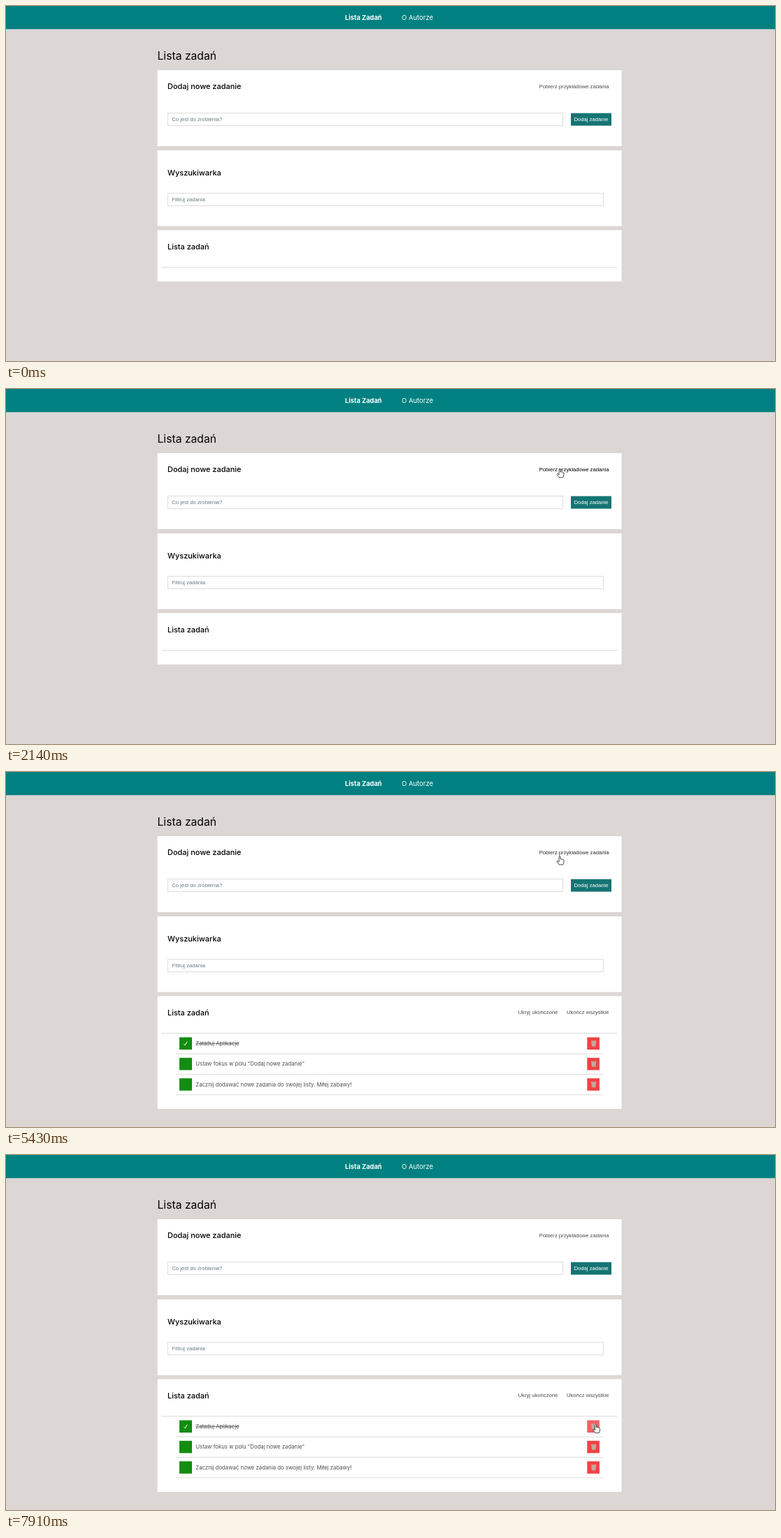
An HTML page that plays this animation: 1100x509 px, repeating every 8 s.

```html
<!DOCTYPE html>
<html lang="pl">
<head>
<meta charset="utf-8">
<title>Lista zadań</title>
<style>
  html, body { margin: 0; width: 100%; height: 100%; overflow: hidden; background: #dcd6d5; }
  svg { display: block; width: 100%; height: 100%; }
  text { font: 7.68px "Liberation Sans", Arial, sans-serif; white-space: pre; }
  .nav { font: 9.5px Inter, sans-serif; fill: #fff; }
  .nav.active { font-weight: 700; font-size: 9.3px; }
  .title { font: 15.7px Inter, sans-serif; }
  .heading { font: 500 10.95px Inter, sans-serif; }
  .task { font: 7.77px Inter, sans-serif; fill: #505050; }
  .done { text-decoration: line-through; }
  .hint { fill: #69797f; }
  .link { fill: #504b47; text-anchor: end; }
  .panel { fill: #fff; }
  .field { fill: #fff; stroke: #ddd; }
  .rule { stroke: #dcdcdc; }
  .cursor { fill: #fff; stroke: #222b33; stroke-width: .85; stroke-linejoin: round; }
</style>
</head>
<body>
<svg viewBox="0 0 1100 509" preserveAspectRatio="none">
  <rect width="1100" height="509" fill="#dcd6d5"/>
  <rect width="1100" height="33.2" fill="#008080"/>
  <text class="nav active" x="485" y="19.8">Lista Zadań</text>
  <text class="nav" x="566" y="19.8">O Autorze</text>
  <text class="title" x="216.5" y="77">Lista zadań</text>

  <rect class="panel" x="216.6" y="92" width="664" height="109"/>
  <text class="heading" x="231" y="119.4">Dodaj nowe zadanie</text>
  <text class="link" id="load" x="862.5" y="118"></text>
  <rect class="field" x="231.5" y="153.5" width="565" height="18"/>
  <text class="hint" x="237.3" y="165.3">Co jest do zrobienia?</text>
  <g id="add">
    <rect x="-29" y="-9" width="58" height="18"/>
    <text y="2.7" fill="#fff" text-anchor="middle">Dodaj zadanie</text>
  </g>

  <rect class="panel" x="216.6" y="207" width="664" height="108.6"/>
  <text class="heading" x="231" y="242.5">Wyszukiwarka</text>
  <rect class="field" x="231.5" y="268.5" width="623" height="18"/>
  <text class="hint" x="237.3" y="280">Filtruj zadania</text>

  <rect class="panel" id="listPanel" x="216.6" y="321.3" width="664"/>
  <text class="heading" x="231" y="348.6">Lista zadań</text>
  <path class="rule" d="M222.5 374.5H874.5"/>
  <g id="list">
    <text class="link" x="789.3" y="347.2">Ukryj ukończone</text>
    <text class="link" x="862.5" y="347.2">Ukończ wszystkie</text>
  </g>

  <path class="cursor" id="arrow" d="M0 0V10L2.3 7.9 3.8 11.2 5.4 10.5 4 7.3H7Z"/>
  <path class="cursor" id="hand" d="M-1 .9Q0-.6 1 .9V4.5Q2 3.8 3 4.7Q4 4.2 4.7 5.2Q6 5 6 6.5V9L4.8 12.4H-.8L-3.8 8.2Q-4 6.4-2.5 7L-1 8.5Z"/>
</svg>
<script>
const LOOP = 8000;
const $ = id => document.getElementById(id);

const tasks = [
  'Załaduj Aplikacje',
  'Ustaw fokus w polu "Dodaj nowe zadanie"',
  'Zacznij dodawać nowe zadania do swojej listy. Miłej zabawy!'
];
$('list').innerHTML += tasks.map((task, i) => `
  <g transform="translate(0 ${389.2 + i * 29.4})">
    <rect x="248" y="-8.8" width="18" height="17.6" fill="#128d10"/>
    ${i ? '' : '<path d="M254.6 .6L256.2 2.5 259.3-2.7" fill="none" stroke="#fff"/>'}
    <text class="task ${i ? '' : 'done'}" x="271.3" y="2.6">${task}</text>
    <rect class="remove" x="831.3" y="-8.8" width="17.6" height="17.6" fill="#ef4343"/>
    <path d="M837-3.4H844.4L843.4 4.2H838Z" fill="#cf9d92"/>
    <path d="M836.8-3.4H844.6M839.7-2V3.5M841.7-2V3.5" stroke="#b9b6aa" stroke-width=".8"/>
    <path class="rule" d="M243 14.8H854.5"/>
  </g>`).join('');

// Pointer strokes: each continues from the end of the one before, bending towards "via".
const ENTRY = [1092, 498];
const strokes = [
  { start: 650, end: 1450, via: [950, 325], to: [813, 160] },
  { start: 1450, end: 2140, via: [764, 132], to: [792, 114.5] },
  { start: 5170, end: 5630, via: [792, 118], to: [792, 122] },
  { start: 6030, end: 6830, via: [862, 174], to: [960, 363] },
  { start: 6900, end: 7640, via: [890, 414], to: [843.5, 386] }
];

const ramp = (t, start, end) => Math.min(1, Math.max(0, (t - start) / (end - start)));
const easeOut = k => 1 - (1 - k) ** 2;
const mix = (from, to, k) => `rgb(${from.map((v, i) => Math.round(v + (to[i] - v) * k))})`;
const show = (el, on) => el.setAttribute('visibility', on ? 'visible' : 'hidden');

function pointerAt(t) {
  return strokes.reduce((from, { start, end, via, to }) => {
    const k = easeOut(ramp(t, start, end));
    return from.map((v, i) => v * (1 - k) ** 2 + 2 * via[i] * k * (1 - k) + to[i] * k * k);
  }, ENTRY);
}

function draw(t) {
  const loading = t >= 3480 && t < 4620;
  const loaded = t >= 4620;
  const [x, y] = pointerAt(t);

  const overAdd = x > 808 && x < 866 && y > 153 && y < 172;
  const overLink = !loading && x > 762 && x < 863 && y < 121;
  const overRemove = loaded && x < 849 && y > 380 && y < 398;
  const pointing = overAdd || overLink || overRemove;
  for (const [cursor, on] of [[$('arrow'), !pointing], [$('hand'), pointing]]) {
    cursor.setAttribute('transform', `translate(${x} ${y})`);
    show(cursor, on && t >= 650);
  }

  // The link darkens on hover, pales while loading, then recovers.
  const shade = 80 * (1 - ramp(t, 1700, 2140) + ramp(t, 5170, 5630))
    + 172 * (ramp(t, 3480, 3810) - ramp(t, 4620, 4970));
  $('load').textContent = loading ? 'Ładowanie...' : 'Pobierz przykładowe zadania';
  $('load').style.fill = mix([0, 0, 0], [255, 240, 229], shade / 255);

  const glow = ramp(t, 1200, 1400) - ramp(t, 1520, 1750);
  $('add').setAttribute('transform', `translate(837 162.6) scale(${1 + glow * .05})`);
  $('add').firstElementChild.setAttribute('fill', mix([20, 117, 115], [36, 130, 125], glow));

  show($('list'), loaded);
  $('listPanel').setAttribute('height', loaded ? 161.8 : 73.7);
  document.querySelector('.remove').setAttribute('fill',
    mix([239, 67, 67], [242, 96, 96], ramp(t, 7440, 7640)));
}

const start = performance.now();
function tick() {
  draw((performance.now() - start) % LOOP);
  requestAnimationFrame(tick);
}
tick();
</script>
</body>
</html>
```
